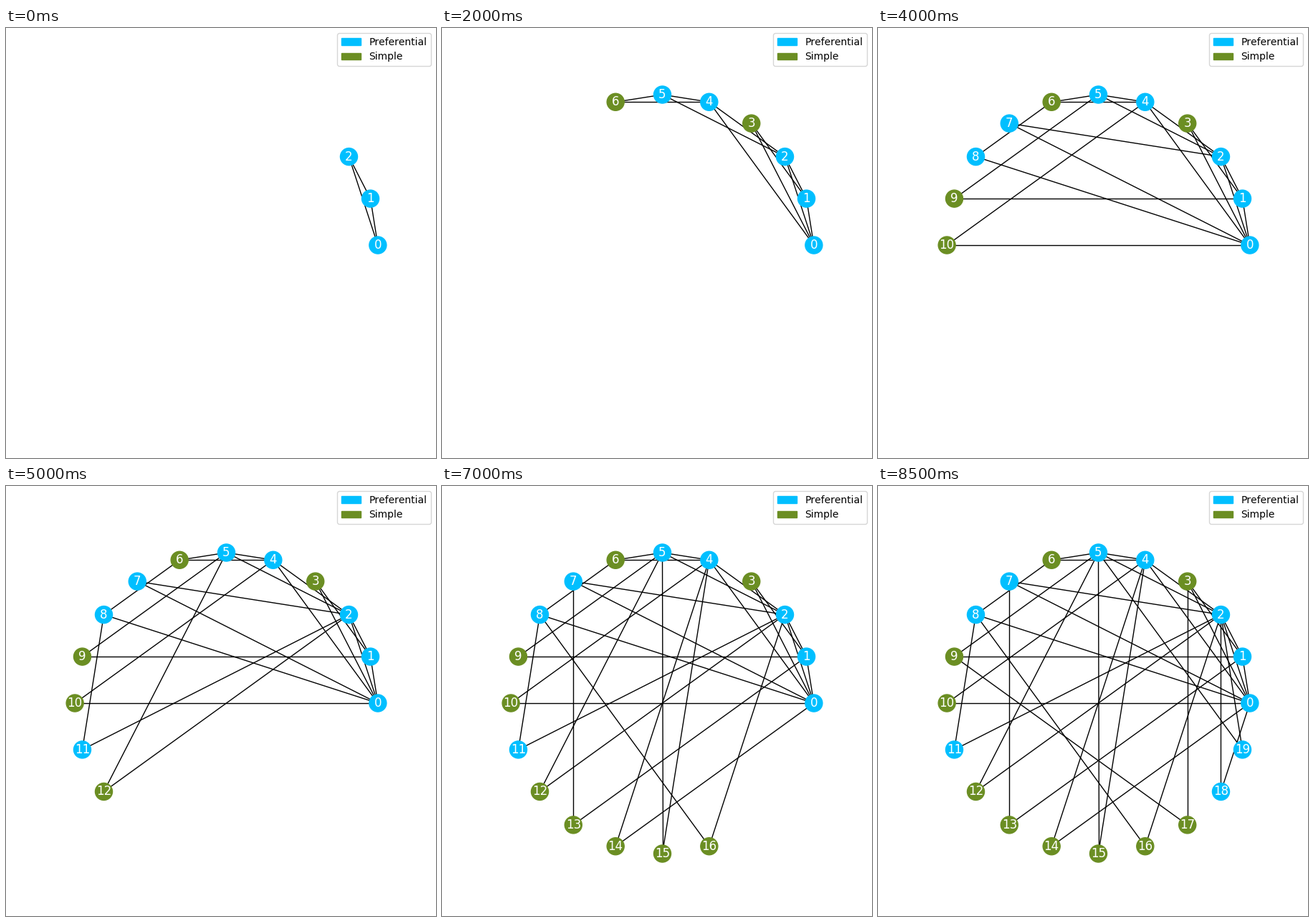
Recreate the animation shown at these times as a matplotlib script. Size 600 by 600 pixels, loop 9 s.

```python
import numpy as np
import matplotlib.pyplot as plt
from matplotlib.animation import FuncAnimation
from matplotlib.collections import LineCollection
from matplotlib.patches import Patch

# Whole-pixel kerning, so letters sit on the pixel grid
plt.rcParams["text.kerning_factor"] = 6

SEED_SIZE = 3
PREF, SIMPLE = "deepskyblue", "olivedrab"
SIMPLE_NODES = {3, 6, 9, 10, *range(12, 18)}

# The graph itself: the two earlier nodes each newcomer joins
JOINS = [(0, 1), (0, 2), (2, 4), (4, 5), (0, 2), (0, 6), (1, 5), (0, 4),
         (2, 8), (2, 5), (1, 7), (0, 4), (4, 5), (2, 8), (3, 9), (0, 2),
         (2, 5)]
N = SEED_SIZE + len(JOINS)

# The growing graph starts as a triangle; edges are kept in order of arrival
edges = [(0, 1), (0, 2), (1, 2)]
edges += [(node, old) for node, pair in enumerate(JOINS, SEED_SIZE)
          for old in pair]

theta = (np.arange(N) / N * 2 * np.pi).astype(np.float32)
pos = np.column_stack([np.cos(theta), np.sin(theta)])
colors = [SIMPLE if n in SIMPLE_NODES else PREF for n in range(N)]

fig, ax = plt.subplots(figsize=(6, 6), dpi=100)
fig.subplots_adjust(left=0.125, right=0.9, bottom=0.11, top=0.88)
fig.legend(handles=[Patch(color=PREF, label="Preferential"),
                    Patch(color=SIMPLE, label="Simple")],
           loc="upper right")


def draw(step):
    count = SEED_SIZE + step
    ax.clear()
    ax.set_axis_off()
    lines = [(pos[a], pos[b]) for a, b in edges if max(a, b) < count]
    ax.add_collection(LineCollection(lines, colors="black", linewidths=1,
                                     zorder=1))
    ax.scatter(*pos[:count].T, s=300, c=colors[:count], linewidths=1,
               zorder=2)
    for n in range(count):
        ax.text(*pos[n], str(n), color="white", fontsize=12,
                ha="center", va="center")
    ax.set(xlim=(-1.1, 1.1), ylim=(-1.1, 1.1))
    return []


anim = FuncAnimation(fig, draw, frames=N - SEED_SIZE + 1, interval=500,
                     repeat=True, repeat_delay=0)
plt.show()
```
